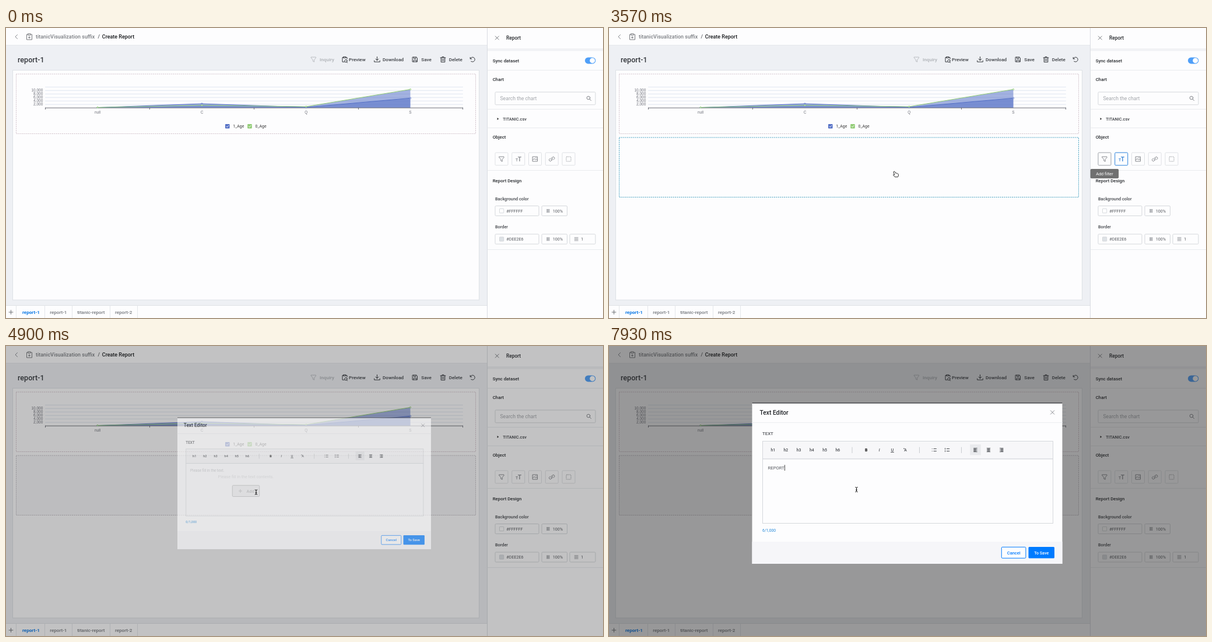
These frames come from a looping animation (1024x498 px, 8000 ms). An HTML page:

```html
<!DOCTYPE html>
<html lang="en">
<head>
<meta charset="utf-8">
<title>Report editor</title>
<style>
  html, body { margin: 0; width: 100%; height: 100%; overflow: hidden; background: #fdfdfe; }
  svg { display: block; width: 1024px; height: 498px; font-family: Roboto, sans-serif; }
  text { white-space: pre; }
  .ic { fill: none; stroke-width: 1; stroke-linecap: round; stroke-linejoin: round; }
</style>
</head>
<body>
<svg id="stage" viewBox="0 0 1024 498" xmlns="http://www.w3.org/2000/svg"></svg>
<script>
const INK = '#3b3e43', GREY = '#85888d', BLUE = '#007bff', LINE = '#e9ebee', EDGE = '#d5d8dc';

// y is the middle of the line
const text = (x, y, s, size, { w = 400, fill = INK, a = 'start', extra = '' } = {}) =>
  `<text x="${x}" y="${(y + size * 0.355).toFixed(2)}" font-size="${size}" font-weight="${w}" fill="${fill}" text-anchor="${a}" ${extra}>${s}</text>`;
const rect = (x, y, w, h, fill, stroke = 'none', extra = '') =>
  `<rect x="${x}" y="${y}" width="${w}" height="${h}" fill="${fill}" stroke="${stroke}" ${extra}/>`;
const path = (d, stroke, extra = '') => `<path class="ic" d="${d}" stroke="${stroke}" ${extra}/>`;
const at = (x, y, body) => `<g transform="translate(${x} ${y})">${body}</g>`;
const group = (id, body) => `<g id="${id}">${body}</g>`;
const hline = (x1, x2, y, c = LINE) => path(`M${x1} ${y}H${x2}`, c, 'stroke-linecap="butt"');
const vline = (x, y1, y2, c = LINE) => path(`M${x} ${y1}V${y2}`, c, 'stroke-linecap="butt"');

const funnel = c => path('M-4 -4H4V-2.6L1.2 .6V4.2L-1.2 3V.6L-4 -2.6Z', c, 'stroke-width=".9"');
const cross = (x, y, c, r = 3) => path(`M${x - r} ${y - r}l${2 * r} ${2 * r}m0 ${-2 * r}l${-2 * r} ${2 * r}`, c, 'stroke-width=".8"');
const plus = (x, y, c, r) => path(`M${x - r} ${y}h${2 * r}M${x} ${y - r}v${2 * r}`, c, 'stroke-width=".8"');

function topBar() {
  const clip = path('M-2 -4H-4.5V5H4.5V-4H2M-2 -5.2H2V-2.8H-2ZM-1.6 1.2H1.6M0 -.4V2.8', '#77797d', 'stroke-width=".9"');
  return rect(0, 0, 825, 30, '#fdfdfe') + hline(0, 825, 29.5, '#e6e8ec') +
    path('M19.5 11.5L16 15l3.5 3.5', GREY, 'stroke-width=".9"') + at(40, 15, clip) +
    text(51, 15, 'titanicVisualization suffix', 8.97, { w: 500, fill: '#7b7e83' }) +
    text(157.5, 15, '/', 8.9, { w: 500, fill: '#55585d' }) +
    text(164.8, 15, 'Create Report', 8.95, { w: 500, fill: '#17191c' });
}

function actions() {
  const c = '#34373c', t = (x, s, fill = INK) => text(x, 54, s, 8.12, { w: 500, fill });
  const preview = path('M-2 -3.5H-4V4.2H-.6M2 -3.5H4V-.8M-2 -4.6H2V-2.6H-2ZM3.4 4.6L4.6 5.6', c) +
    `<circle cx="2" cy="2.6" r="2.2" class="ic" stroke="${c}"/>`;
  const download = path('M0 -4.6V1.6M-2.6 -1L0 1.6L2.6 -1M-4.8 2V4.2H4.8V2', c);
  const save = path('M-4 -4H2.6L4 -2.6V4H-4ZM-2 -4V-1.6H1.6V-4M-2.2 4V1H2.2V4', c, 'stroke-width=".9"');
  const trash = path('M-4.4 -3H4.4M-1.4 -3V-4.6H1.4V-3M-3.3 -3V4.6H3.3V-3M-1.2 -.8V2.6M1.2 -.8V2.6', c, 'stroke-width=".9"');
  const undo = path('M-3.8 -3.6V-1H-1.2M-3.6 -1.2A4 4 0 1 1 -2.4 3.2', c, 'stroke-width=".9"');
  return text(20, 54.3, 'report-1', 12.6, { w: 500, fill: '#33363b' }) +
    at(527.5, 54, funnel('#b9bcc1')) + t(538, 'Inquiry', '#adb0b5') +
    at(581, 54, preview) + t(588, 'Preview') + at(636.5, 54, download) + t(646, 'Download') +
    at(701.5, 54, save) + t(712.3, 'Save') + at(749.5, 54, trash) + t(759.7, 'Delete') + at(800, 54, undo);
}

function chart() {
  const px = [157, 336, 514.8, 693.5], blue = [136.6, 130, 136.2, 120.4], green = [136.4, 132.8, 135, 105.4];
  const axis = (x, y, s, a) => text(x, y, s, 6.5, { fill: '#6e7079', a, extra: 'font-family="Liberation Sans, sans-serif"' });
  const pts = ys => px.map((x, i) => x + ' ' + ys[i]).join('L');
  const area = ys => `<path d="M${pts(ys)}V137H157Z" fill="#5470c6" opacity=".53"/>`;
  const line = (ys, c) => path('M' + pts(ys), c, 'stroke-width="1.2"') +
    px.map((x, i) => `<circle cx="${x}" cy="${ys[i]}" r="1.1" fill="#fff" stroke="${c}"/>`).join('');
  let s = '';
  for (let i = 1; i < 7; i++) s += hline(67.5, 783.5, 137.2 - i * 5.98, '#e0e6f1');
  for (let i = 1; i < 6; i++) s += axis(63.3, 137 - i * 6, 2 * i + ',000', 'end');
  s += area(blue) + area(green) + hline(67.5, 783.5, 137.2, '#6e7079');
  for (let i = 0; i < 5; i++) s += vline(67.5 + i * 179, 137, 139.6, '#6e7079');
  s += line(blue, '#5470c6') + line(green, '#91cc75');
  ['null', 'C', 'Q', 'S'].forEach((n, i) => s += axis(px[i], 144.2, n, 'middle'));
  [[376, '#5470c6', '1_Age'], [414.2, '#91cc75', '0_Age']].forEach(([x, c, n]) => {
    s += rect(x, 165, 7.6, 7.6, c, 'none', 'rx="1"') + path(`M${x + 2} 168.8l1.4 1.5l2.5 -2.9`, '#fff') +
      text(x + 13.4, 168.8, n, 6.9, { fill: '#333' });
  });
  return s;
}

const dashed = (y, fill, c) => rect(17.5, y, 788, 102.5, fill, c, 'stroke-width=".9" stroke-dasharray="2 1.4"');

function tabs() {
  let s = rect(0, 477, 825, 21, '#fdfdfe') + hline(0, 825, 476.5, '#dfe2e6') + plus(8.5, 488, '#6d7075', 3.4);
  [17.5, 66.5, 113.5, 178.5, 225.5].forEach(x => s += vline(x, 477, 498, '#e4e6ea'));
  [[43, 'report-1'], [89.8, 'report-1'], [145.8, 'titanic-report'], [201.6, 'report-2']].forEach(([x, n], i) =>
    s += text(x, 488, n, 8.1, { w: i ? 500 : 700, fill: i ? '#75787d' : '#0a78e6', a: 'middle' }));
  return s;
}

const toolX = i => 839 + i * 28.75;
const toolBox = (i, c) => rect(toolX(i), 214, 22, 21.8, '#fdfdfe', c, 'rx="1.5"');
const tText = c => text(-4.8, 1.2, 'T', 7, { w: 500, fill: c }) + text(-1, 0, 'T', 10.5, { w: 500, fill: c });

function panel() {
  const field = (x, y, w) => rect(x, y, w, 17, '#fdfdfe', EDGE, 'rx="1.5"');
  const head = (y, s) => text(834.7, y, s, 7.85, { w: 500, fill: '#26292d' });
  const label = (y, s) => text(839, y, s, 7.3, { w: 500, fill: '#43464b' });
  const value = (x, y, s) => text(x, y, s, 7.15, { fill: '#55585d' });
  const grip = (x, y) => path(`M${x} ${y - 2.2}h5M${x} ${y}h5M${x} ${y + 2.2}h5M${x + 1.2} ${y - 2.6}v5M${x + 3.7} ${y - 2.6}v5`, '#999ca1', 'stroke-width=".6"');
  const icons = [
    funnel(GREY), tText(GREY),
    path('M-4 -4H4V4H-4ZM-4 1.4L-1.4 -.6L1 1.4L2.4 .4L4 1.6M1.2 -2h1', GREY, 'stroke-width=".9"'),
    path('M-.8 1.8A2.3 2.3 0 0 1 -.8 -1.2L1.4 -3.4A2.2 2.2 0 0 1 4.4 -.4L2.9 1.1M.8 -1.8A2.3 2.3 0 0 1 .8 1.2L-1.4 3.4A2.2 2.2 0 0 1 -4.4 .4L-2.9 -1.1', GREY, 'stroke-width=".9"'),
    rect(-4, -4, 8, 8, 'none', GREY, 'rx="1" stroke-dasharray="1.4 1.2" stroke-width=".9"')
  ];
  let s = rect(825, 0, 199, 498, '#fdfdfe') + vline(825.5, 0, 498, '#d9dce1') +
    rect(826, 35, 198, 4.5, '#f1f2f5') + cross(842.3, 17, '#777a7f') +
    text(858, 17, 'Report', 8.4, { w: 500, fill: '#26292d' }) + head(56, 'Sync dataset') +
    rect(993, 50.4, 18.4, 11, '#4f9ff8', 'none', 'rx="5.5"') + '<circle cx="1005.8" cy="55.9" r="4.5" fill="#fff"/>';
  [72.5, 139.5, 171.5, 244.5, 380.5].forEach(y => s += hline(826, 1024, y));
  s += head(88, 'Chart') + rect(839, 110, 172, 21.8, '#fdfdfe', EDGE, 'rx="1.5"') +
    text(847.5, 121, 'Search the chart', 8.65, { fill: '#a2a5aa' }) +
    '<circle cx="999" cy="120" r="2.8" class="ic" stroke="#85888d"/>' + path('M1001.2 122.2L1003.6 124.6', GREY) +
    '<path d="M842.6 154l2.6 2l-2.6 2Z" fill="#222"/>' +
    text(852.3, 156, 'TITANIC.csv', 7.3, { w: 500 }) + head(187.5, 'Object');
  icons.forEach((icon, i) => s += toolBox(i, '#dfe1e5') + at(toolX(i) + 11, 225, icon));
  s += head(262, 'Report Design');
  [[293, 'Background color', 314, '#FFFFFF', '#fff'], [341.5, 'Border', 362.5, '#DEE2E6', '#dee2e6']].forEach(([ly, name, y, hex, fill]) => {
    s += label(ly, name) + field(839, y - 8.5, 75) + rect(846.5, y - 3.6, 7.2, 7.2, fill, '#cfd2d6', 'stroke-width=".8" rx=".6"') +
      value(858.3, y, hex) + field(919, y - 8.5, 43.5) + grip(927.3, y) + value(937.8, y, '100%');
  });
  s += field(967, 354, 44) + path('M975.2 360h6M975.2 362.5h6M975.2 365h6', GREY, 'stroke-width=".8"') + value(986.2, 362.5, '1');
  return s;
}

const tip = (x, w, s) => rect(x, 242, w, 16.2, '#616161', 'none', 'rx="2" opacity=".9"') +
  text(x + w / 2, 250, s, 7.35, { fill: '#fff', a: 'middle' });

function block() {
  return dashed(188, '#f6f6f9', '#b9b5bc') +
    text(411.5, 224.5, 'Please fill in the text contents.', 7.2, { fill: '#a9abb0', a: 'middle' }) +
    rect(388.3, 239.3, 46.4, 19.2, '#fdfdfe', '#c3c6ca', 'id="addBtn" rx="1.5"') +
    plus(402, 249, '#66696e', 2.6) + text(412.6, 249, 'Add', 7.4, { w: 500, fill: '#55585d' });
}

function modal() {
  const c = '#45484d', small = (x, s, extra) => text(x, 178.6, s, 6.8, { w: 500, fill: c, a: 'middle', extra });
  const bars = (x, shift) => {
    let d = '';
    for (let i = 0; i < 5; i++) d += `M${x - 2.8 + (i % 2) * shift} ${175.6 + i * 1.5}h${i % 2 ? 3.6 : 5.6}`;
    return path(d, c, 'stroke-width=".8" stroke-linecap="butt"');
  };
  const list = (x, mark) => path(`M${x} 176.5h4.4M${x} 180.5h4.4`, c, 'stroke-width=".9"') + path(mark, c, 'stroke-width="1.1"');
  let s = rect(245.5, 97.5, 532, 276.5, '#fdfdfe') + rect(245.5, 97.2, 532, 1.4, '#36373b') +
    text(258.5, 114, 'Text Editor', 10.25, { w: 500, fill: '#1f2226' }) + cross(760.6, 114, '#8b8e93', 3.2) +
    hline(245.5, 777.5, 131.5, '#eceef1') + text(263, 150.3, 'TEXT', 7.8, { w: 500, fill: '#55585d' }) +
    rect(263.5, 163.5, 498, 30.5, '#f7f7f9', EDGE) + rect(263.5, 194, 498, 110.5, '#fdfdfe', EDGE);
  for (let i = 1; i < 7; i++) s += small(259 + i * 22.2, 'h' + i);
  [417, 532.5, 604.5].forEach(x => s += vline(x, 174, 183.5, '#c9ccd0'));
  s += text(441.2, 178.6, 'B', 6.8, { w: 900, fill: '#222', a: 'middle' }) + small(463.6, 'I', 'font-style="italic"') +
    small(486, 'U') + hline(483.6, 488.4, 182.4, c) + small(508.6, 'A') + path('M505.4 176.2h1.4', c) +
    list(557, 'M554.2 176.5h.1M554.2 180.5h.1') + list(579.4, 'M576.6 175.6v1.8M576.6 179.6v1.8') +
    rect(619.2, 169, 18.6, 18.4, '#e9eaed') + bars(628.5, 0) + bars(651, 1) + bars(673.2, 2) +
    text(272.5, 209, '', 7.72, { fill: '#55585d', extra: 'id="typed"' }) +
    text(272.5, 209, 'Please fill in the text.', 7.75, { fill: '#c3c5c9', extra: 'id="hint"' }) +
    rect(0, 204.2, 0.9, 9.8, '#333', 'none', 'id="caret"') +
    text(263, 316.7, '', 6.75, { fill: '#1f86d8', extra: 'id="count"' }) +
    rect(245.5, 336, 532, 38, '#f6f6f9') +
    rect(673.3, 345.3, 41.6, 19, '#fdfdfe', BLUE, 'rx="1.5"') + text(694.2, 355, 'Cancel', 7.4, { w: 500, fill: BLUE, a: 'middle' }) +
    rect(719.5, 345, 44.5, 19.6, BLUE, 'none', 'rx="1.5"') + text(741.8, 355, 'To Save', 7.15, { w: 500, fill: '#fff', a: 'middle' });
  return s;
}

const pen = 'fill="#fff" stroke="#111" stroke-width=".9" stroke-linejoin="round"';
const cursors =
  group('arrow', `<path d="M-3 -5V4.4L-.8 2.4L.6 5.4L2.2 4.7L.8 1.8H3.8Z" ${pen}/>`) +
  group('hand', `<path d="M-3.6 -4.4Q-2.4 -5.3 -1.5 -4L-.3 -1.6Q.8 -2.3 1.5 -1.5Q2.5 -1.9 3 -.9Q4.1 -.8 4.3 .6V3.2L3.4 4.8H-1.6L-4.3 1.6Q-4.4 .4 -3.1 .6L-2.2 1.1L-3.9 -3Z" ${pen}/>`) +
  group('beam', path('M-1.8 -4Q0 -4 0 -3Q0 -4 1.8 -4M0 -3V3M-1.8 4Q0 4 0 3Q0 4 1.8 4M-1 .9H1', '#111', 'stroke-width="1.3"'));

const stage = document.getElementById('stage');
stage.innerHTML =
  rect(0, 0, 1024, 498, '#eef0f4') + topBar() + actions() +
  rect(11.5, 72.5, 800, 394.5, '#fdfdfe', '#dee2e6') + dashed(79, 'none', '#cbb9c3') + chart() +
  group('drop', dashed(188, '#fdfdfe', '#2f96b8')) + group('block', block()) +
  tabs() + panel() +
  group('hoverText', rect(toolX(1), 214, 22, 21.8, 'none', '#aaadb2', 'rx="1.5"')) +
  group('activeText', toolBox(1, '#2f86e0') + at(toolX(1) + 11, 225, tText('#2f7fd6'))) +
  group('hoverFilter', rect(toolX(0), 214, 22, 21.8, 'none', '#aaadb2', 'rx="1.5"')) +
  group('tipText', tip(856.3, 45, 'Add Text')) + group('tipFilter', tip(825.7, 48.5, 'Add filter')) +
  rect(0, 0, 1024, 498, '#212121', 'none', 'id="scrim"') + group('modal', modal()) + group('cursor', cursors);

const $ = id => document.getElementById(id);
const LOOP = 8000, OPEN = 4836, WORD = 'REPORT', KEYS = [6750, 6950, 7130, 7310, 7500, 7680];

// visible spans in ms
const spans = {
  cursor: [1050, LOOP], arrow: [1050, 1380], hand: [1380, 4250], beam: [4250, LOOP],
  hoverText: [1380, 1950], tipText: [1450, 2180], activeText: [1950, 3760],
  hoverFilter: [2200, 3760], tipFilter: [2280, 3760], drop: [2360, 3760], block: [3760, LOOP], modal: [OPEN, LOOP]
};

// time, x, y
const route = [
  [1050, 915, 262], [1500, 884, 231], [2080, 884, 231], [2240, 848, 230], [2850, 520, 385],
  [3400, 492, 251], [3850, 492, 251], [4450, 429, 251], [5050, 429, 251], [5500, 424.5, 246.5], [LOOP, 424.5, 246.5]
];

const clamp = v => Math.min(1, Math.max(0, v));
const easeOut = (p, n) => 1 - (1 - clamp(p)) ** n;

function place(t) {
  let i = 1;
  while (i < route.length - 1 && t > route[i][0]) i++;
  const [t0, x0, y0] = route[i - 1], [t1, x1, y1] = route[i];
  const p = clamp((t - t0) / (t1 - t0)), e = p * p * (3 - 2 * p);
  return `translate(${x0 + (x1 - x0) * e} ${y0 + (y1 - y0) * e})`;
}

function draw(t) {
  for (const id in spans) $(id).style.display = t >= spans[id][0] && t < spans[id][1] ? '' : 'none';
  $('cursor').setAttribute('transform', place(t));

  const over = t >= 4350;
  $('addBtn').setAttribute('fill', over ? '#d9d9dc' : '#fdfdfe');
  $('addBtn').setAttribute('stroke', over ? '#6b6d72' : '#c3c6ca');

  const p = (t - OPEN) / 300, open = easeOut(p, 4.2), k = 0.5 + open / 2;
  $('scrim').setAttribute('opacity', 0.46 * easeOut(p, 3.6));
  $('modal').setAttribute('opacity', open);
  $('modal').setAttribute('transform', `translate(511.5 236) scale(${k}) translate(-511.5 -236)`);

  const n = KEYS.filter(key => t >= key).length;
  const since = t - (n ? KEYS[n - 1] : 5000);
  const typed = $('typed');
  typed.textContent = WORD.slice(0, n);
  $('hint').style.display = n ? 'none' : '';
  $('count').textContent = n + '/1,000';
  $('caret').setAttribute('x', 272.3 + (n && typed.getComputedTextLength() + 0.4));
  $('caret').style.display = since >= 0 && Math.floor(since / 500) % 2 === 0 ? '' : 'none';
}

let start;
function tick(now) {
  start ??= now;
  draw((now - start) % LOOP);
  requestAnimationFrame(tick);
}
draw(0);
requestAnimationFrame(tick);
</script>
</body>
</html>
```
